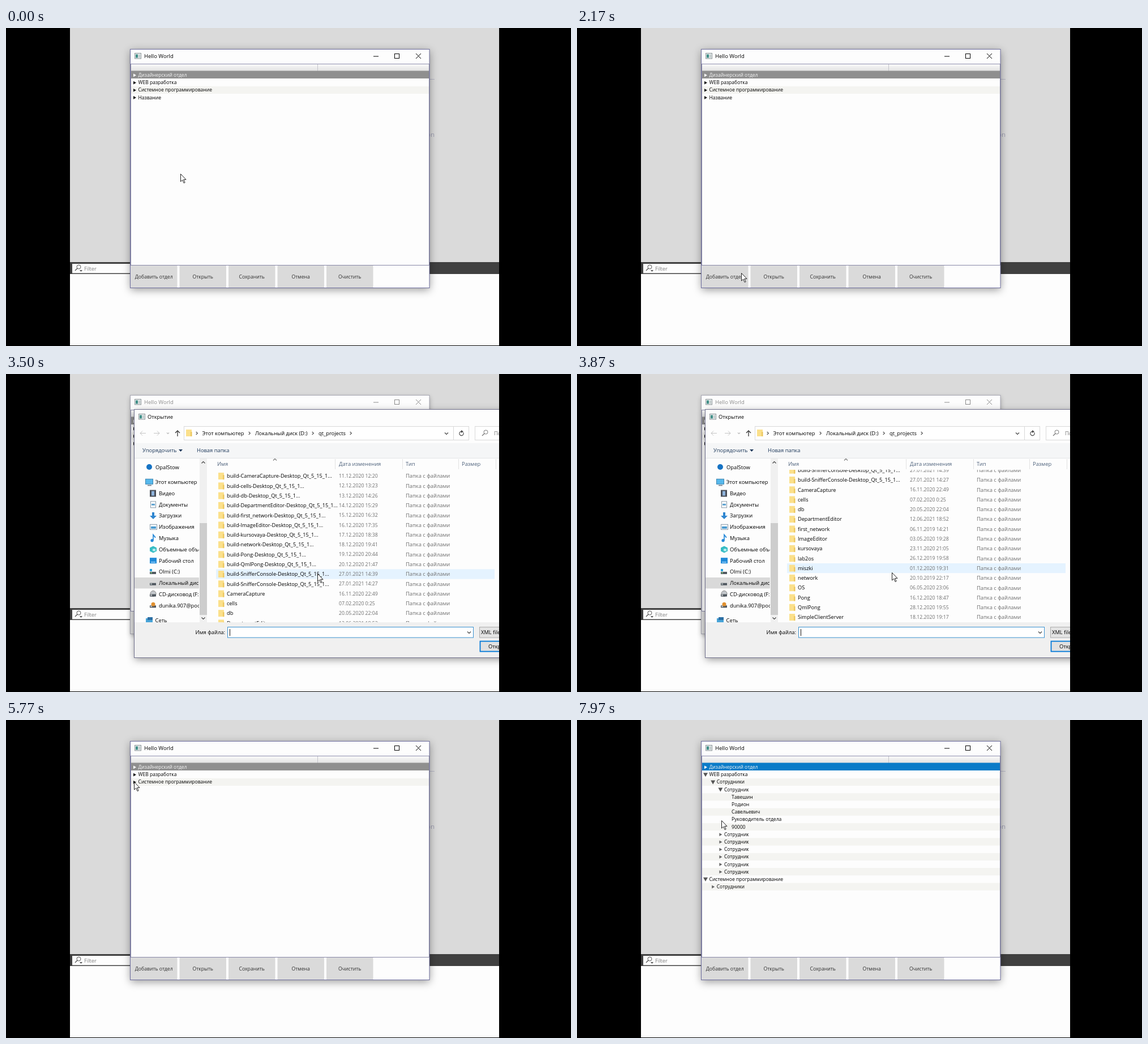
Animation of 998 by 561 pixels, one loop 8 s. Source, as an HTML page with a canvas:

```html
<!DOCTYPE html>
<html lang="ru">
<head>
<meta charset="utf-8">
<style>
html, body { margin: 0; width: 100%; height: 100%; overflow: hidden; background: #000; }
canvas { display: block; }
</style>
</head>
<body>
<canvas id="stage" width="998" height="561"></canvas>
<script>
const c = document.getElementById('stage').getContext('2d');
const LOOP = 8000, ROW = 13.19, FILE_ROW = 17.29;

// Moments at which something happens, in ms
const T = { openClick: 2700, dialog: 3420, pick: 4640, close: 5130,
            system: 5930, web: 6400, staff: 6930, person: 7560 };

const cursorPath = [
  [0, 308, 257], [350, 309, 260], [1050, 330, 405], [1600, 300, 430], [2170, 290, 432],
  [2520, 345, 434], [2720, 347, 436], [3130, 490, 387], [3500, 550, 352], [3870, 556, 350],
  [4200, 554, 356], [4640, 444, 407], [5130, 442, 408], [5700, 226, 109], [5960, 226, 109],
  [6250, 226, 95], [6450, 226, 95], [6800, 239, 108], [6960, 239, 108], [7400, 252, 121],
  [7600, 252, 121], [7900, 255, 177], [8000, 255, 177]
];
const scrollSteps = [[0, .4], [3600, 2], [3670, 5], [3740, 8], [3810, 11], [3980, 14], [4060, 17], [4140, 20], [4220, 23]];

const files = [
  ...['CameraCapture', 'cells', 'db', 'DepartmentEditor', 'first_network', 'ImageEditor',
      'kursovaya', 'network', 'Pong', 'QmlPong'].map((n, i) =>
        `build-${n}-Desktop_Qt_5_15_1...|${11 + i}.12.2020 ${12 + i}:${20 + 3 * i}`),
  'build-SnifferConsole-Desktop_Qt_5_15_1...|27.01.2021 14:39',
  'build-SnifferConsole-Desktop_Qt_5_15_1...|27.01.2021 14:27',
  'CameraCapture|16.11.2020 22:49', 'cells|07.02.2020 0:25', 'db|20.05.2020 22:04',
  'DepartmentEditor|12.06.2021 18:52', 'first_network|06.11.2019 14:21',
  'ImageEditor|03.05.2020 19:28', 'kursovaya|23.11.2020 21:05', 'lab2os|26.12.2019 19:58',
  'miszki|01.12.2020 19:31', 'network|20.10.2019 22:17', 'OS|06.05.2020 23:06',
  'Pong|16.12.2020 18:47', 'QmlPong|28.12.2020 19:55', 'SimpleClientServer|18.12.2020 19:17',
  'simpleUcpClient|19.12.2020 21:25', 'SnifferConsole|23.02.2021 20:47',
  'sortingAlgs|07.02.2020 21:25', 'split|20.07.2020 20:49', 'test|13.12.2020 21:41',
  'testBoost|05.08.2020 18:57', 'testBoostMSVC|24.07.2020 13:36',
  'testingQTest|28.12.2020 15:12', 'udpserver|23.12.2019 12:56', 'ws|25.04.2021 17:32',
  'tst.xml|08.06.2021 12:49|6 КБ', 'tst2.xml|12.06.2021 19:14|5 КБ'
].map(s => s.split('|'));
const PICKED = files.length - 2;

const places = ['Этот компьютер', 'Видео', 'Документы', 'Загрузки', 'Изображения', 'Музыка',
  'Объемные объекты', 'Рабочий стол', 'Olmi (C:)', 'Локальный диск (D:)', 'CD-дисковод (F:)',
  'dunika.907@poch'];

function rect(x, y, w, h, fill, stroke, lineWidth = 1) {
  if (fill) { c.fillStyle = fill; c.fillRect(x, y, w, h); }
  if (stroke) { c.strokeStyle = stroke; c.lineWidth = lineWidth; c.strokeRect(x, y, w, h); }
}
function trace(points) {
  c.beginPath();
  for (let i = 0; i < points.length; i += 2) c.lineTo(points[i], points[i + 1]);
}
function line(points, color, width = 1) {
  trace(points);
  c.strokeStyle = color; c.lineWidth = width; c.stroke();
}
function shape(points, color) {
  trace(points);
  c.fillStyle = color; c.fill();
}
function circle(x, y, r, fill, stroke) {
  c.beginPath(); c.arc(x, y, r, 0, 7);
  if (fill) { c.fillStyle = fill; c.fill(); }
  if (stroke) { c.strokeStyle = stroke; c.lineWidth = 1; c.stroke(); }
}
function text(s, x, y, color = '#000', size = 9.35, align = 'left') {
  c.font = `500 ${size}px "Open Sans", "Noto Sans", sans-serif`;
  c.textAlign = align; c.textBaseline = 'alphabetic'; c.fillStyle = color;
  c.fillText(s, x, y + size * .355);
}
function clipped(x, y, w, h, draw) {
  c.save(); c.beginPath(); c.rect(x, y, w, h); c.clip();
  draw();
  c.restore();
}
function shadowed(blur, alpha, draw) {
  c.save();
  c.shadowColor = `rgba(0,0,0,${alpha})`; c.shadowBlur = blur; c.shadowOffsetY = 3;
  draw();
  c.restore();
}
const chevronRight = (x, y, color = '#444') => line([x - 1.3, y - 2.6, x + 1.3, y, x - 1.3, y + 2.6], color, 1.1);
const chevron = (x, y, color = '#444', dir = 1, r = 3) =>
  line([x - r, y - dir * r / 2, x, y + dir * r / 2, x + r, y - dir * r / 2], color, 1.2);
function magnifier(x, y, color) {
  circle(x + 1.5, y - 1.5, 3.5, null, color);
  line([x - 1, y + 1, x - 5, y + 5], color, 1.3);
}
function appIcon(x, y) {
  rect(x + .5, y + .5, 11, 9.5, '#e9eeee', '#8c9498');
  rect(x + 2, y + 2.5, 4, 6, '#3f8d86');
  rect(x + 7, y + 2.5, 3, 6, '#c3cccc');
}
function folder(x, y) {
  rect(x, y - 6, 10, 12, '#fbe08b');
  rect(x + 8, y - 2, 2.5, 8, '#edc75f');
}

function backdrop() {
  rect(0, 0, 998, 561, '#000');
  rect(113, 0, 758, 413, '#dadada');
  rect(113, 413, 758, 21, '#404040');
  rect(113, 434, 758, 126, '#fdfdfd');
  rect(117, 416, 110, 16.5, '#fdfdfd');
  magnifier(127, 423, '#555');
  shape([130, 427, 135, 427, 132.5, 430], '#555');
  text('Filter', 138, 425, '#808080');
  line([740, 90.5, 757, 90.5], '#b4b4c4');
  text('on', 757, 188, '#9a9aae', 11.5, 'right');
}

function treeRows(t) {
  const rows = [];
  const add = (depth, label, open) => rows.push({ depth, label, open });
  add(0, 'Дизайнерский отдел', false);
  add(0, 'WEB разработка', t >= T.web);
  if (t >= T.web) add(1, 'Сотрудники', t >= T.staff);
  if (t >= T.staff) {
    add(2, 'Сотрудник', t >= T.person);
    if (t >= T.person)
      ['Тавешин', 'Родион', 'Савельевич', 'Руководитель отдела', '90000'].forEach(s => add(3, s));
    for (let i = 0; i < 6; i++) add(2, 'Сотрудник', false);
  }
  add(0, 'Системное программирование', t >= T.system);
  if (t >= T.system) add(1, 'Сотрудники', false);
  if (t < T.close) add(0, 'Название', false);
  return rows;
}

function mainWindow(t) {
  const active = t < T.openClick || t >= T.close;
  const ink = active ? '#000' : '#8a8a8a';
  shadowed(active ? 14 : 8, active ? .4 : .3, () => rect(219.5, 37.5, 528.5, 421, '#fdfdfd'));
  rect(219.5, 37.5, 528.5, 421, null, active ? '#6c6c9c' : '#a4a4b0');
  appIcon(227, 44);
  text('Hello World', 244, 50, ink, 9.5);
  line([649, 50, 658, 50], ink);
  rect(686.5, 45.5, 8, 8, null, ink);
  line([724, 45, 733, 54], ink);
  line([733, 45, 724, 54], ink);

  const header = c.createLinearGradient(0, 63, 0, 76);
  header.addColorStop(0, '#fbfbfb');
  header.addColorStop(1, '#e2e2e2');
  rect(220, 63, 528, 13, header);
  line([550.5, 64, 550.5, 76], '#c4c4cc');
  line([220, 63.5, 748, 63.5], '#9090b0');
  line([747.5, 63, 747.5, 418], '#7c7c9c');
  line([220.5, 63, 220.5, 418], '#8c8ca4');

  treeRows(t).forEach(({ depth, label, open }, i) => {
    const y = 83 + i * ROW, x = 227 + depth * ROW;
    if (i === 0) rect(221, 75.5, 526, 13.5, t >= T.system ? '#0a7bc8' : '#8f8f8f');
    else if (i % 2 === 0) rect(221, y - 6.6, 526, ROW, '#f4f4f1');
    if (open) shape([x - 4, y - 3, x + 4, y - 3, x, y + 4], '#555');
    else if (open === false) shape([x - 2, y - 2.5, x + 3, y + .3, x - 2, y + 3.2],
                                   i === 0 ? '#fff' : depth ? '#666' : '#111');
    text(label, x + 6.5, y, i === 0 ? '#f4f4f4' : '#000', 8.55);
  });

  line([220, 418.5, 748, 418.5], '#8888a8');
  ['Добавить отдел', 'Открыть', 'Сохранить', 'Отмена', 'Очистить'].forEach((label, i) => {
    const x = 220 + i * 86.5;
    rect(x, 419, 82.5, 39, '#dadada');
    text(label, x + 41.2, 438.5, '#303030', 8.7, 'center');
  });
}

function placeIcon(i, x, y) {
  const drive = color => { rect(x, y, 11, 4, '#505860'); rect(x + 1, y + 1, 3, 1.5, color); };
  [
    () => { rect(x - 6.5, y - 5.5, 13, 9, '#56b8ec', '#3d84ae'); rect(x - 3, y + 5, 7, 1.5, '#607080'); },
    () => { rect(x, y - 6, 11, 12, '#4a4f58'); rect(x + 3, y - 4, 5, 8, '#8fb4dc'); },
    () => { rect(x + 1.5, y - 5.5, 9, 11, '#fff', '#8a9aa8'); line([x + 3, y, x + 9, y], '#5aa0d0', 3); },
    () => shape([x + 4, y - 6, x + 8, y - 6, x + 8, y, x + 12, y, x + 6, y + 6, x, y, x + 4, y], '#2f86d0'),
    () => { rect(x + .5, y - 4.5, 12, 9, '#fff', '#8a9aa8'); rect(x + 2, y - 1, 9, 4, '#4b9bd0'); },
    () => { circle(x + 4, y + 4, 2.6, '#2388d8'); line([x + 6, y + 4, x + 6, y - 6, x + 10, y - 1], '#2388d8', 1.7); },
    () => { shape([x, y - 3, x + 6, y - 6, x + 12, y - 3, x + 12, y + 3, x + 6, y + 6, x, y + 3], '#36bcc4'); rect(x + 5, y - 1, 5, 4, '#b9eef0'); },
    () => { rect(x, y - 5, 12, 10, '#1f8ad8'); rect(x + 2, y + 2, 8, 1.5, '#9bd4ff'); },
    () => { drive('#7fd07f'); rect(x, y - 5, 4, 4, '#28a0d8'); },
    () => drive('#c8d0d0'),
    () => { circle(x + 6, y - 1, 5, '#c4c8cc', '#888'); drive('#ddd'); },
    () => { drive('#ddd'); circle(x + 6, y - 2, 3.5, '#e09030'); }
  ][i]();
}

function sidebar() {
  clipped(227, 149, 114, 289, () => {
    circle(253, 164, 5, '#1673c4');
    text('OpalStow', 264, 164.5);
    places.forEach((label, i) => {
      const y = 190.8 + i * 19.77;
      if (label.startsWith('Локальный')) rect(227, y - 9.8, 114, 19.5, '#d9d9d9');
      placeIcon(i, i ? 254 : 253, y);
      text(label, i ? 270 : 263.5, y);
    });
    rect(247, 431, 12, 8, '#48a4d8');
    rect(250, 429, 9, 5, '#2c6fa4');
    text('Сеть', 263.5, 434.8);
  });
  rect(342, 149, 13, 289, '#f0f0f0');
  rect(342, 263, 13, 162, '#cdcdcd');
  chevron(348.5, 156, '#444', -1);
  chevron(348.5, 431, '#444');
}

function fileList(t, [cx, cy]) {
  const scroll = scrollSteps.filter(s => s[0] <= t).pop()[1];
  const muted = '#6d6d6d';
  clipped(356, 169, 515, 269, () => files.forEach(([name, date, size], i) => {
    const y = 187 + (i - scroll) * FILE_ROW, top = y - FILE_ROW / 2;
    if (y < 155 || y > 450) return;
    if (i === PICKED && t >= T.pick) rect(371.5, top + .5, 491, FILE_ROW - 1, '#cce8ff', '#99d1ff');
    else if (cx > 371 && cy > 169 && cy >= top && cy < top + FILE_ROW) rect(371, top, 492, FILE_ROW, '#e5f3ff');
    if (size) {
      rect(375.5, y - 5.5, 9, 11.5, '#fff', '#8c8c8c');
      shape([381, y - 6, 385, y - 2, 381, y - 2], '#8c8c8c');
      text(size, 859, y, muted, 9.2, 'right');
    } else folder(375, y);
    text(name, 390, y, '#000', 9.2);
    text(date, 588, y, muted, 8.7);
    text(size ? 'Документ XML' : 'Папка с файлами', 706, y, muted);
  }));
  const headerInk = '#4c607a';
  text('Имя', 373, 159, headerInk);
  text('Дата изменения', 588, 159, headerInk);
  text('Тип', 706, 159, headerInk);
  text('Размер', 805, 159, headerInk);
  [581.5, 700.5, 799.5, 865.5].forEach(x => line([x, 150, x, 168], '#e2e2e2'));
  chevron(475, 151, '#777', -1);
}

function openDialog(t, cursor) {
  const picked = t >= T.pick;
  shadowed(13, .42, () => rect(226.5, 62.5, 690, 438, '#fdfdfd'));
  appIcon(234, 70);
  text('Открытие', 250, 75.5);

  for (const [x, dir, color] of [[242, -1, '#c4c4c4'], [266, 1, '#c4c4c4']]) {
    line([x - 5, 104.5, x + 5, 104.5], color);
    line([x + dir, 100.5, x + dir * 5, 104.5, x + dir, 108.5], color);
  }
  chevron(286, 104.5, '#bbb', 1, 2);
  line([303, 110, 303, 100], '#333', 1.3);
  line([299, 104, 303, 100, 307, 104], '#333', 1.3);
  rect(314.5, 92.5, 503, 24, '#fff', '#d9d9d9');
  line([790.5, 92, 790.5, 116], '#d9d9d9');
  folder(318, 104);
  [337, 430, 542, 609].forEach(x => chevronRight(x, 104.5));
  text('Этот компьютер', 346.5, 104.5);
  text('Локальный диск (D:)', 440, 104.5);
  text('qt_projects', 552, 104.5);
  chevron(778, 105);
  c.beginPath(); c.arc(804.5, 105, 3.6, -.6, 4.6);
  c.strokeStyle = '#444'; c.lineWidth = 1.2; c.stroke();
  shape([804, 99, 808, 101.5, 804, 104], '#444');
  rect(828.5, 92.5, 80, 24, '#fff', '#d9d9d9');
  magnifier(846, 104, '#777');
  text('Поиск: qt_projects', 862, 104.5, '#777');

  rect(227, 122, 690, 26, '#f5f6f7');
  line([227, 148.5, 871, 148.5], '#e4e6e8');
  text('Упорядочить', 241, 135, '#1e395b');
  shape([305, 133, 312, 133, 308.5, 137], '#1e395b');
  text('Новая папка', 337, 135, '#1e395b');
  sidebar();
  fileList(t, cursor);

  rect(227, 438, 690, 62, '#f0f0f0');
  text('Имя файла:', 387, 455.5, '#000', 9.35, 'right');
  rect(391.5, 446.5, 434, 18.5, '#fff', picked ? '#7a7a88' : '#3a92d0');
  if (picked) text('tst.xml', 394, 455.8);
  else line([395.5, 450, 395.5, 462], '#111');
  chevron(818, 456);
  rect(836.5, 446.5, 80, 18.5, '#e4e4e4', '#adadad');
  text('XML files (*.xml)', 839, 455.5);
  rect(837.5, 471.5, 80, 18, '#e1e1e1', '#0078d7', 1.8);
  text('Открыть', 852, 480.5);
  rect(226.5, 62.5, 690, 438, null, '#70708c');
}

function cursorAt(t) {
  const i = cursorPath.findIndex(p => p[0] > t);
  const [t0, x0, y0] = cursorPath[i - 1], [t1, x1, y1] = cursorPath[i];
  const k = (t - t0) / (t1 - t0), e = k * k * (3 - 2 * k);
  return [x0 + (x1 - x0) * e, y0 + (y1 - y0) * e];
}
function pointer([x, y]) {
  c.save();
  c.translate(Math.round(x) + .5, Math.round(y) + .5);
  trace([0, 0, 0, 13.5, 3.2, 10.6, 5.6, 16, 7.6, 15.1, 5.2, 9.9, 9.5, 9.9]);
  c.closePath();
  c.fillStyle = '#fff'; c.fill();
  c.strokeStyle = '#222'; c.lineWidth = 1; c.stroke();
  c.restore();
}

function draw(t) {
  const cursor = cursorAt(t);
  backdrop();
  clipped(113, 0, 758, 560, () => {
    mainWindow(t);
    if (t >= T.dialog && t < T.close) openDialog(t, cursor);
    pointer(cursor);
  });
}

const start = performance.now();
function tick() {
  draw((performance.now() - start) % LOOP);
  requestAnimationFrame(tick);
}
tick();
</script>
</body>
</html>
```
